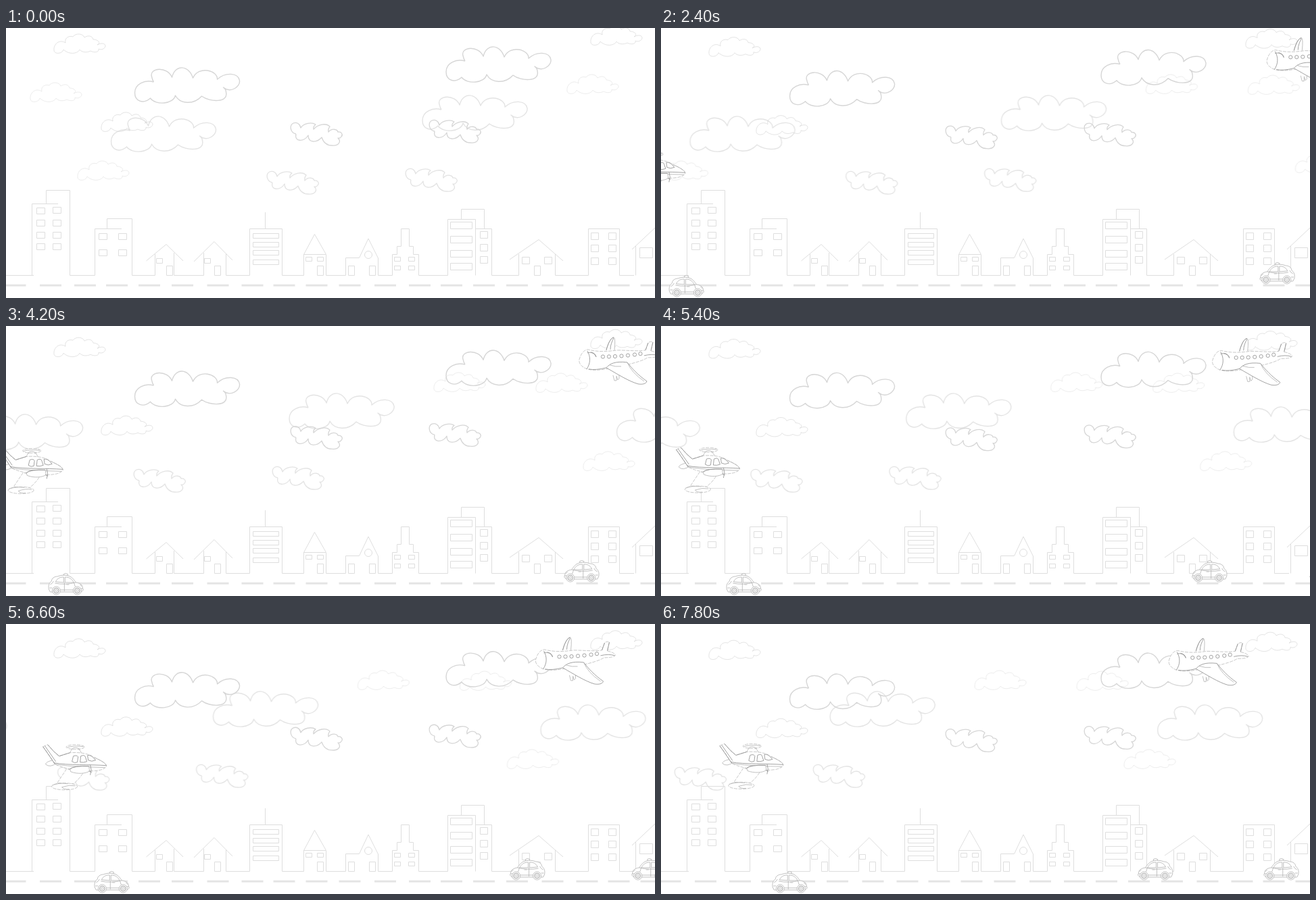
Write an HTML page that moves like this. It is 960 px wide and 400 px high and loops after 8000 ms.

```html
<!DOCTYPE html>
<html lang="en">
<head>
<meta charset="utf-8">
<title>City sketch</title>
<style>
  html, body { margin: 0; width: 100%; height: 100%; overflow: hidden; background: #fff; }
  svg { display: block; width: 960px; height: 400px; }
  #city { fill: none; stroke: #dedede; }
  #road { stroke: #e5e5e5; stroke-width: 3; }
  .clouds { fill: none; stroke: #d6d6d6; stroke-linejoin: round; }
  .craft { fill: #fff; stroke: #b2b2b2; stroke-width: .8; stroke-linejoin: round; }
  .craft .dark { stroke: #8c8c8c; }
  .craft .open { fill: none; }
  .craft .faint { stroke: #bcbcbc; stroke-dasharray: 5 1.5; }
</style>
</head>
<body>
<svg viewBox="0 0 960 400">
  <defs>
    <path id="big" stroke-width="1.4" d="M28 22C15 18 0 25 0 38C0 51 13 55 23 46C31 57 57 55 60 42C67 55 87 56 99 43C111 52 139 53 135 37Q135 33 131 30C142 39 156 29 155 20C153 8 134 7 122 18C123 5 95-3 86 16C80-3 60-5 55 15C48-2 21 1 25 14Q26 19 28 22"/>
    <path id="small" stroke-width="1" opacity=".68" d="M1 25C0 16 9 8 18 14C16 6 24 3 29 5C33-1 44 0 46 6C52 2 58 4 59 9C66 9 71 14 65 17C70 14 77 14 77 19C76 23 71 25 67 23C68 28 61 29 55 26C49 29 42 28 39 24C37 29 25 33 15 24C13 31 1 31 1 25"/>
    <path id="wavy" stroke-width="1.3" d="M8 17C-1 15-2 4 4 1C9-1 14 2 15 8C19 1 31-1 37 3Q33 6 34 10C40 3 52 0 58 6Q55 10 56 14C61 8 69 10 70 14C75 13 78 18 75 21Q73 24 70 23C76 29 70 35 61 34C52 34 48 28 46 22C39 30 26 31 26 19C20 29 5 29 8 17"/>
    <g id="cloudset">
      <use href="#small" x="35" y="80"/>
      <use href="#small" x="105" y="196"/>
      <use href="#small" x="829" y="68"/>
      <use href="#big" x="155.5" y="130"/>
      <use href="#big" x="616" y="99"/>
      <use href="#wavy" x="386" y="212"/>
      <use href="#wavy" x="591" y="208"/>
    </g>
    <g id="car" class="craft">
      <path d="M23 4V1.5Q26-.5 29 1.5V4"/>
      <path d="M3 28L1 24C0 19 1 15 5 12C5 8 9 5 14 5C21 2 30 3 34 6C37 8 39 11 41 14C48 15 51 18 51 22L52 25L49 28Z"/>
      <path class="open" d="M11 13C14 7 18 6 23 6V14ZM25 6C32 6 35 9 38 14H25ZM8 12Q6 16 3 17M24 14V27M10 15Q25 18 41 14M18 25H37M38 14L40 20M47 17L50 20M27 17H31M2 22H6M47 23H51"/>
      <g id="wheel"><circle cx="12" cy="26" r="6"/><circle class="dark" cx="12" cy="26" r="3.8"/><circle cx="12" cy="26" r="1.7"/></g>
      <use href="#wheel" x="31"/>
    </g>
  </defs>

  <g class="clouds" id="sinking"><use href="#cloudset"/></g>
  <g class="clouds" id="drifting" opacity=".68">
    <use href="#cloudset"/><use href="#cloudset" x="945" y="-11"/>
  </g>

  <path id="road"/>
  <g id="city">
    <path d="M0 366.5H41M38.5 366.5V260.5H77M59.5 260V240.5H94.5V366.5H131.5V297.5H171M149.5 297V282.5H186.5V366.5H220.5V335M207.5 345L237 320.5L262 345M248.5 333V366.5H292.5V333M278 346L308 316.5L335 344M325.5 334V366.5H360.5V297.5H408.5V366.5H440.5V335.5L456.5 305.5L473.5 335.5V366.5H502.5V340.5H522.5L536 312L550.5 341V366.5H571.5V335.5H578.5V323.5H584.5V297.5H596.5V323.5H602.5V335.5H610.5V366.5H653.5V283.5H694.5V366.5M673.5 283V268.5H707.5V297M694 297.5H718.5V366.5H758.5V335M745 343L788 313.5L824 345M812.5 335V366.5H861.5V297.5H907.5V366.5H929M931.5 323V366.5M926 328L960 296M383.5 273V297M440 335.5H473"/>
    <circle cx="536" cy="336" r="5.5"/>
    <path id="windows"/>
  </g>

  <g id="jet" class="craft">
    <path d="M40 20C42 12 46 2 51 1Q54 2 52 20"/>
    <path class="open dark" d="M40 20C42 12 46 2 51 1M46 19C46 12 49 6 51 2"/>
    <path class="faint" d="M98 20L102 9Q106 6 109 8L106 21C111 22 116 24 118 27Q117 31 101 31C94 36 72 42 52 45C38 49 22 51 12 48C3 45-1 39 0 34C2 26 7 19 13 19C28 23 42 22 56 20C72 20 86 22 98 20Z"/>
    <path class="open dark" d="M12 21C17 30 17 39 11 48M12 24C18 22 23 25 25 30M17 23Q24 24 25 30M102 9L98 20M109 8L106 21M96 28Q108 25 117 28M40 46Q24 50 14 48"/>
    <path d="M50 57L52 65L55 65L55 59M55 58L57 64L59 62V56"/>
    <path class="dark" d="M40 46C45 40 53 36 71 38C78 47 87 57 100 66C99 70 93 71 87 70C73 66 56 55 40 46Z"/>
    <path class="open" d="M71 38Q77 53 96 66M45 42Q54 45 62 44"/>
    <g id="portholes" class="dark"></g>
  </g>

  <g id="seaplane" class="craft">
    <path d="M40 14C41 5 54 3 57 14"/>
    <ellipse class="faint" cx="48" cy="4.5" rx="13.5" ry="3.4"/>
    <path class="open" d="M42 8Q47 3 55 8M36 5Q46 2 60 4"/>
    <path d="M16 24C8 25 4 28 4 30Q10 36 21 28Z"/>
    <path class="faint" d="M0 4L7 1L16 11L24 18L40 13C56 12 67 14 76 20C87 25 94 29 94 33C91 38 82 40 71 40C50 40 29 36 18 30C13 23 8 13 0 4Z"/>
    <path class="open dark" d="M0 4L18 30M3 3L19 26M7 1L16 11L24 18M16 28C38 32 69 30 94 32M24 18L40 13"/>
    <path class="open" d="M18 30C42 34 70 34 92 35M76 20C87 25 94 29 94 33"/>
    <path class="dark" d="M45 18Q50 16 52 19L51 27Q47 29 43 26ZM56 18Q62 15 63 20L65 26Q60 28 55 27ZM66 17Q71 15 78 24Q72 27 67 24Z"/>
    <path class="faint" d="M35 37L21 58L45 59Q54 52 60 42Z"/>
    <ellipse class="faint" cx="32" cy="63" rx="19" ry="5"/>
    <path class="open" d="M14 61Q24 57 37 59M28 64Q39 60 48 62M28 64Q31 68 39 67"/>
    <path d="M40 37Q46 32 68 33L69 40C64 44 51 45 41 41Z"/>
    <path class="open dark" d="M40 37Q46 32 68 33M70 31Q73 38 70 46M68 40L72 42"/>
  </g>

  <g id="cars"></g>
</svg>
<script>
const $ = id => document.getElementById(id);
const SVG = 'http://www.w3.org/2000/svg';

function add(parent, tag, attrs) {
  const el = document.createElementNS(SVG, tag);
  for (const key in attrs) el.setAttribute(key, attrs[key]);
  return parent.appendChild(el);
}

// Window grids: every combination of columns and rows, with one pane size.
let panes = '';
function grid(columns, rows, w, h) {
  for (const x of columns) for (const y of rows)
    panes += `M${x + .5} ${y + .5}h${w}v${h}h${-w}z`;
}
grid([45], [266, 284, 302, 319], 12, 9);
grid([69], [265, 284, 302, 319], 12, 9);
grid([137, 166], [304, 328], 12, 9);
grid([222, 293], [341], 9, 7);
grid([237, 308], [352], 9, 14);
grid([365], [304, 317, 329, 343], 38, 7);
grid([443, 460], [339], 9, 6);
grid([460, 506, 537, 781], [352], 9, 14);
grid([574, 595], [339, 352], 9, 6);
grid([657], [287, 308, 329, 348], 32, 10);
grid([701], [301, 320, 338], 11, 10);
grid([763, 796], [339], 11, 10);
grid([865, 891], [303, 321, 340], 11, 10);
grid([937], [325], 19, 15);
$('windows').setAttribute('d', panes);

let dashes = '';
for (let x = -197.5; x < 960; x += 247.5)
  for (const dx of [0, 51, 98, 146, 195]) dashes += `M${x + dx} 381.2h32`;
$('road').setAttribute('d', dashes);

[35, 44, 53, 62.5, 72, 82, 90.5].forEach((x, i) =>
  add($('portholes'), 'circle', { cx: x, cy: 29.6 - i * i * .12, r: 2.6 }));

// Position at time zero and velocity in px per second.
const movers = [
  { el: $('sinking'), x: 35, y: -72, vx: 0, vy: 1.95 },
  { el: $('drifting'), x: 0, y: 0, vx: -46.9, vy: 0 },
  { el: $('jet'), x: 960.7, y: 10.6, vx: -26.85, vy: 1.25 },
  { el: $('seaplane'), x: -122.6, y: 185, vx: 26.85, vy: -1.1 }
];
function addCar(x, y, vx) {
  const el = add($('cars'), 'use', { href: '#car' });
  movers.push({ el, x: vx < 0 ? x + 52 : x, y, vx, vy: 0, flip: vx < 0 });
}
addCar(-56.5, 366, 28.3);
addCar(966, 347, -33.4);
addCar(1112.5, 347, -28.3);

function draw(now) {
  const t = Math.floor(now % 8000 / 200) * .2;
  for (const m of movers)
    m.el.setAttribute('transform',
      `translate(${m.x + m.vx * t} ${m.y + m.vy * t})${m.flip ? ' scale(-1 1)' : ''}`);
}
const start = performance.now();
function tick() {
  draw(performance.now() - start);
  requestAnimationFrame(tick);
}
tick();
</script>
</body>
</html>
```
